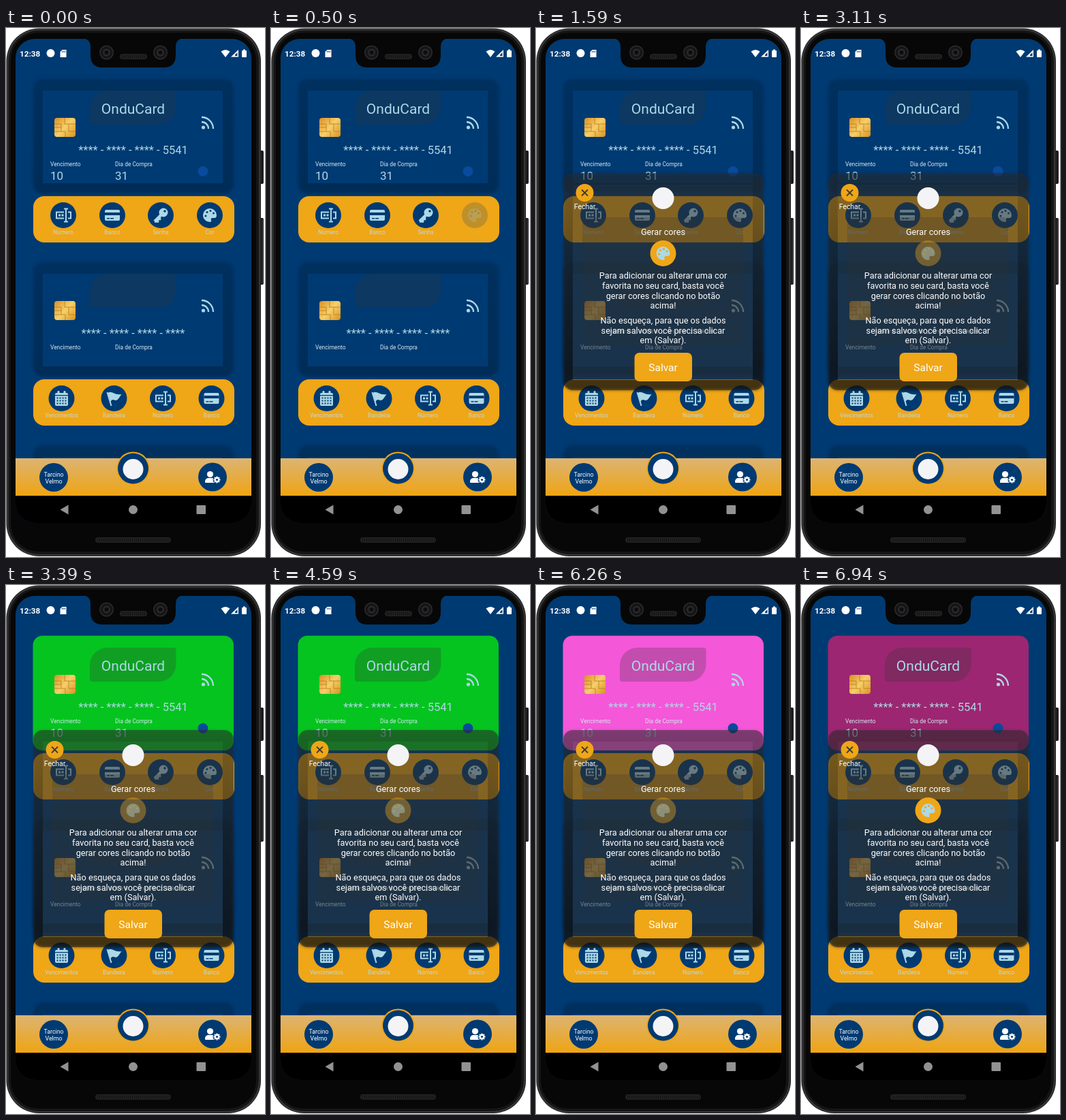
Write an HTML page with a canvas that moves like this. It is 380 px wide and 777 px high and loops after 8000 ms.

```html
<!DOCTYPE html>
<html lang="pt">
<head>
<meta charset="utf-8">
<title>Gerar cores</title>
<style>
html, body { margin: 0; width: 100%; height: 100%; overflow: hidden; background: #fff; }
canvas { display: block; width: 100%; height: 100%; }
</style>
</head>
<body>
<canvas id="stage"></canvas>
<script>
const W = 380, H = 777, LOOP = 8000;
const NAVY = '#003a72', ORANGE = '#efa617', ICE = '#add8e6', WHITE = '#fff';
const MID = 186.5, CARD_GAP = 269;

const canvas = document.getElementById('stage');
const ctx = canvas.getContext('2d');
const dpr = window.devicePixelRatio || 1;
canvas.width = W * dpr;
canvas.height = H * dpr;

// ---------- helpers ----------
function box(x, y, w, h, r, fill) {
  ctx.beginPath();
  ctx.roundRect(x, y, w, h, r);
  ctx.fillStyle = fill;
  ctx.fill();
}

function disc(x, y, r, fill) {
  ctx.beginPath();
  ctx.arc(x, y, r, 0, Math.PI * 2);
  ctx.fillStyle = fill;
  ctx.fill();
}

function poly(points, fill) {
  ctx.beginPath();
  points.forEach(([x, y]) => ctx.lineTo(x, y));
  ctx.closePath();
  ctx.fillStyle = fill;
  ctx.fill();
}

function line(points, width, color) {
  ctx.beginPath();
  points.forEach(([x, y], i) => i ? ctx.lineTo(x, y) : ctx.moveTo(x, y));
  ctx.lineWidth = width;
  ctx.strokeStyle = color;
  ctx.stroke();
}

function text(s, x, y, size, color = WHITE, align = 'center', weight = 400) {
  ctx.font = `${weight} ${size}px Roboto, sans-serif`;
  ctx.textAlign = align;
  ctx.fillStyle = color;
  ctx.fillText(s, x, y);
}

function fade(y0, y1, from, to) {
  const g = ctx.createLinearGradient(0, y0, 0, y1);
  g.addColorStop(0, from);
  g.addColorStop(1, to);
  return g;
}

function at(x, y, draw) {
  ctx.save();
  ctx.translate(x, y);
  draw();
  ctx.restore();
}

// Soft shadow seen only around an untouched inner rectangle.
function ring(x, y, w, h, top, bottom) {
  ctx.save();
  ctx.beginPath();
  ctx.rect(0, 0, W, H);
  ctx.rect(x + 14, y + 17, w - 30, h - 32);
  ctx.clip('evenodd');
  ctx.filter = `blur(${2 * dpr}px)`;
  box(x, y, w, h, 14, fade(y, y + h, `rgba(0,0,0,${top})`, `rgba(0,0,0,${bottom})`));
  ctx.restore();
}

// ---------- icons, drawn around 0,0 ----------
function palette(hole = NAVY) {
  ctx.beginPath();
  ctx.arc(0, 0, 10, Math.PI / 2, Math.PI * 2);
  ctx.bezierCurveTo(10, 5, 6, 4, 4, 4);
  ctx.bezierCurveTo(-1, 4, 5, 10, 0, 10);
  ctx.fillStyle = ICE;
  ctx.fill();
  [[-6, 1], [-4, -4.5], [1, -6.5], [5.5, -3]].forEach(([x, y]) => disc(x, y, 1.5, hole));
}

function field() {
  line([[1, -4.5], [-10, -4.5], [-10, 4.5], [1, 4.5]], 2, ICE);
  line([[7, -4.5], [11, -4.5], [11, 4.5], [7, 4.5]], 2, ICE);
  line([[4, -9], [4, 9]], 2, ICE);
  line([[1, -9.5], [7, -9.5]], 2, ICE);
  line([[1, 9.5], [7, 9.5]], 2, ICE);
  box(-7, -1.5, 3, 3, 0, ICE);
  box(-2.5, -1.5, 3, 3, 0, ICE);
}

function plastic() {
  box(-11, -8, 22, 16, 2, ICE);
  box(-11, -4, 22, 4, 0, NAVY);
  box(-8, 4, 4, 1.5, 0, NAVY);
  box(-3, 4, 5, 1.5, 0, NAVY);
}

function key() {
  line([[2, -2], [-9, 9]], 4, ICE);
  line([[-9, 9.5], [-4, 9.5], [-4, 6], [-1, 6], [-1, 2]], 2.5, ICE);
  disc(4, -4, 6.5, ICE);
  disc(6, -6, 1.8, NAVY);
}

function calendar() {
  box(-9.5, -8, 19, 19, 2, ICE);
  box(-6, -11, 3, 5, 1, ICE);
  box(3, -11, 3, 5, 1, ICE);
  box(-9.5, -5, 19, 1.2, 0, NAVY);
  for (let r = 0; r < 3; r++)
    for (let c = 0; c < 4; c++) box(-7 + c * 4, -1.5 + r * 4, 2, 2, 0, NAVY);
}

function flag() {
  line([[-10, -9], [-4, 11]], 2, ICE);
  ctx.beginPath();
  ctx.moveTo(-9, -8);
  ctx.bezierCurveTo(-3, -12, 0, -4, 11, -6);
  ctx.bezierCurveTo(8, -2, 6, 3, 2, 3);
  ctx.bezierCurveTo(-1, 2, -3, 1, -5, 5);
  ctx.fillStyle = ICE;
  ctx.fill();
}

function person() {
  disc(-3.5, -4, 4.6, WHITE);
  box(-11, 1.5, 14, 7, [5, 3, 0, 1], WHITE);
  disc(6.5, 4, 6, NAVY);
  for (let i = 0; i < 8; i++) {
    const a = i * Math.PI / 4;
    line([[6.5, 4], [6.5 + 5 * Math.cos(a), 4 + 5 * Math.sin(a)]], 2, WHITE);
  }
  disc(6.5, 4, 3.7, WHITE);
  disc(6.5, 4, 1.6, NAVY);
}

// ---------- cards ----------
function chip(x, y) {
  const g = ctx.createLinearGradient(x, y, x + 31, y + 28);
  g.addColorStop(0, '#d98f24');
  g.addColorStop(.5, '#f6cf6a');
  g.addColorStop(1, '#d8931f');
  box(x, y, 31, 28, 4, g);
  const c = '#b87a1c';
  line([[x, y + 9], [x + 10, y + 9], [x + 10, y + 20], [x, y + 20]], .8, c);
  line([[x + 31, y + 9], [x + 21, y + 9], [x + 21, y + 20], [x + 31, y + 20]], .8, c);
  line([[x + 10, y + 14], [x, y + 14]], .8, c);
  line([[x + 15, y], [x + 15, y + 9], [x + 21, y + 9]], .8, c);
  line([[x + 10, y + 20], [x + 16, y + 20], [x + 16, y + 28]], .8, c);
}

function waves(x, y) {
  disc(x + 2.5, y, 2.6, ICE);
  [10, 17].forEach(r => {
    ctx.beginPath();
    ctx.arc(x, y + 2, r, -Math.PI / 2, 0);
    ctx.lineWidth = 2.3;
    ctx.strokeStyle = ICE;
    ctx.stroke();
  });
}

function card(index, color, info) {
  at(0, index * CARD_GAP, () => {
    if (color) box(39.5, 74.5, 294.5, 168.5, 14, color);
    else ring(40, 75, 294, 168, .17, .23);
    box(123, 92, 126.5, 50, [26, 4, 26, 4], 'rgba(50,50,50,.25)');
    chip(71, 132);
    waves(287, 146);
    text('**** - **** - **** - ' + (info ? info.last : '****'), MID, 185, 16.5, ICE);
    text('Vencimento', 65, 203, 8.4, '#d3e9f1', 'left');
    text('Dia de Compra', 160, 203, 8.4, '#d3e9f1', 'left');
    if (!info) return;
    text(info.name, MID, 126, 21, ICE);
    text(info.due, 65, 223, 17, ICE, 'left');
    text(info.buy, 160, 223, 17, ICE, 'left');
    disc(289, 210.5, 7.5, '#0a4a9c');
  });
}

function toolbar(y, items, dim = 1) {
  box(40, y, 295, 68, 16, ORANGE);
  items.forEach(([x, label, icon], i) => {
    ctx.globalAlpha = i === 3 ? dim : 1;
    disc(x, y + 28, 19, NAVY);
    at(x, y + 28, icon);
    text(label, x, y + 56, 8.4, '#c4d8d4');
    ctx.globalAlpha = 1;
  });
}

const TOOLS_A = [[84, 'Número', field], [156, 'Banco', plastic], [227, 'Senha', key], [299, 'Cor', () => palette()]];
const TOOLS_B = [[81.5, 'Vencimentos', calendar], [158.5, 'Bandeira', flag], [230, 'Número', field], [301.5, 'Banco', plastic]];
const INFO = { name: 'OnduCard', last: '5541', due: '10', buy: '31' };

// ---------- modal ----------
const LINES = [
  ['Para adicionar ou alterar uma cor', 368], ['favorita no seu card, basta você', 383],
  ['gerar cores clicando no botão', 398], ['acima!', 412],
  ['Não esqueça, para que os dados', 434], ['sejam salvos você precisa clicar', 449],
  ['em (Salvar).', 463]
];

function modal(dy, logo, dim) {
  at(0, dy, () => {
    box(40, 213, 294, 319, 14, 'rgba(47,47,47,.55)');
    ring(40, 213, 294, 319, .08, .5);
    box(68, 278, 236, 188, 8, 'rgba(47,47,47,.22)');
    disc(71.5, 242, 13, ORANGE);
    line([[67, 237.5], [76, 246.5]], 1.8, '#3c3c34');
    line([[76, 237.5], [67, 246.5]], 1.8, '#3c3c34');
    text('Fechar', 71.5, 266, 10.4);
    if (logo) disc(MID, 250, 16, '#f4f4f6');
    text('Gerar cores', MID, 304, 12.7);
    ctx.globalAlpha = dim;
    disc(MID, 331, 19, ORANGE);
    at(MID, 331, () => palette(ORANGE));
    ctx.globalAlpha = 1;
    LINES.forEach(([s, y]) => text(s, MID, y, 12.7));
    box(144.5, 477, 84.5, 42, 7, ORANGE);
    text('Salvar', MID, 503.5, 15.5);
  });
}

// ---------- phone ----------
function body() {
  box(371, 180, 7, 49, 2, '#1d1d1d');
  box(371, 279, 7, 98, 2, '#1d1d1d');
  box(376, 281, 1.2, 94, 1, '#444');
  box(.5, .5, 373.5, 775.5, 48, '#262626');
  box(2, 2, 370.5, 772.5, 46, '#3b3b3b');
  box(3.5, 3.5, 367.5, 769.5, 45, '#151515');
  box(7, 7, 360, 762, 41, '#070707');
  grille(131, 748, 111, 8);
}

function grille(x, y, w, h) {
  box(x, y, w, h, h / 2, '#222');
  for (let i = 3; i < w - 2; i += 3) line([[x + i, y + 1.5], [x + i + 1, y + h - 1.5]], .8, '#0c0c0c');
}

function notch() {
  ctx.beginPath();
  ctx.moveTo(112, 15);
  ctx.quadraticCurveTo(124, 16, 124, 28);
  ctx.lineTo(124, 40);
  ctx.quadraticCurveTo(124, 58, 142, 58);
  ctx.lineTo(231, 58);
  ctx.quadraticCurveTo(249, 58, 249, 40);
  ctx.lineTo(249, 28);
  ctx.quadraticCurveTo(249, 16, 261, 15);
  ctx.fillStyle = '#070707';
  ctx.fill();
  [147.5, 226.5].forEach(x => {
    disc(x, 36, 10.5, '#2c2c2e');
    disc(x, 36, 9, '#151517');
    disc(x, 36, 5.5, '#29292c');
    disc(x, 36, 3, '#0d0d10');
  });
  grille(167, 38, 40, 8);
}

function statusBar() {
  text('12:38', 20, 42, 11.7, WHITE, 'left', 700);
  disc(65.5, 37, 6, WHITE);
  poly([[82.5, 32], [88.5, 32], [88.5, 43], [79.5, 43], [79.5, 35]], WHITE);
  [82.5, 84.5, 86.5].forEach(x => line([[x, 33.5], [x, 36]], .9, NAVY));
  ctx.beginPath();
  ctx.moveTo(322, 43);
  ctx.lineTo(315.5, 34.5);
  ctx.quadraticCurveTo(322, 29.5, 328.5, 34.5);
  ctx.fillStyle = WHITE;
  ctx.fill();
  poly([[341, 32], [341, 42.5], [330, 42.5]], WHITE);
  poly([[339.5, 36], [339.5, 41], [336, 41], [336, 39.5]], NAVY);
  box(346, 33, 7, 10, 1, WHITE);
  box(348, 31.5, 3, 2, 0, WHITE);
}

function tabBar() {
  box(14, 632, 346, 55, 0, fade(632, 687, '#dcb473', '#efa413'));
  disc(70, 660, 21, NAVY);
  text('Tarcino', 70, 658.5, 8.8);
  text('Velmo', 70, 668.5, 8.8);
  disc(MID, 647, 24.5, ORANGE);
  disc(MID, 647, 22.5, NAVY);
  disc(MID, 648, 15, '#f4f4f6');
  disc(303, 659.5, 21, NAVY);
  at(303, 659.5, person);

  const grey = '#929292';
  box(14, 687, 346, 40, 0, '#000');
  poly([[79.5, 707.5], [91.5, 700.5], [91.5, 714.5]], grey);
  disc(186.5, 707.5, 6.5, grey);
  box(279.5, 701, 13.5, 13, 1, grey);
}

// ---------- timeline ----------
const TAPS = [
  { down: 3110, up: 3390, steps: 3, color: '#05c41f' },
  { down: 4590, up: 4850, steps: 4, color: '#f457d8' },
  { down: 6260, up: 6730, steps: 3, color: '#9c2671' }
];
const OPEN = 1230;

// Opacity of a pressed button that recovers in equal steps.
function press(t, down, up, steps, low) {
  if (t < down) return 1;
  if (t < up) return low;
  const p = Math.min(1, Math.floor((t - up) / 70) / steps);
  return low + (1 - low) * p;
}

function draw(t) {
  const colored = TAPS.filter(tap => t >= tap.up).pop();
  const tap = TAPS.filter(tap => t >= tap.down).pop();

  ctx.setTransform(dpr, 0, 0, dpr, 0, 0);
  ctx.fillStyle = WHITE;
  ctx.fillRect(0, 0, W, H);
  body();

  ctx.save();
  ctx.beginPath();
  ctx.roundRect(14, 16, 346, 711, 28);
  ctx.clip();
  ctx.fillStyle = NAVY;
  ctx.fillRect(14, 16, 346, 711);
  card(0, colored && colored.color, INFO);
  toolbar(247, TOOLS_A, press(t, 500, OPEN, 5, .2));
  card(1);
  toolbar(516, TOOLS_B);
  card(2);
  if (t >= OPEN) {
    const settled = t >= OPEN + 80;
    modal(settled ? 0 : 10, settled, tap ? press(t, tap.down, tap.up, tap.steps, .4) : 1);
  }
  tabBar();
  statusBar();
  ctx.restore();
  notch();
}

const start = performance.now();
function tick() {
  draw((performance.now() - start) % LOOP);
  requestAnimationFrame(tick);
}
tick();
</script>
</body>
</html>
```
